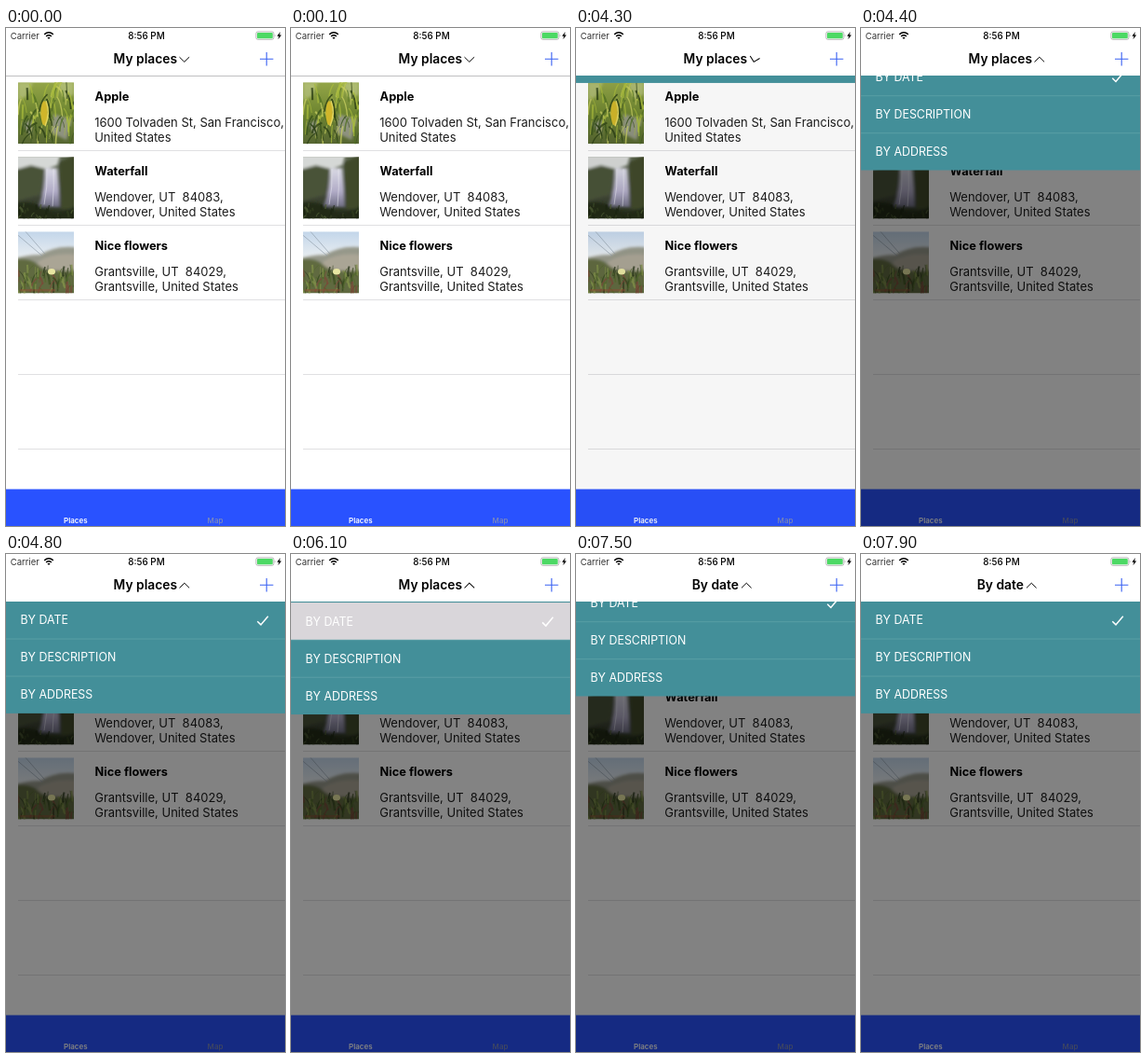
These frames come from a looping animation (300 by 534 pixels, 8 s). An HTML page:

```html
<!DOCTYPE html>
<html lang="en">
<head>
<meta charset="utf-8">
<title>My places</title>
<style>
  html, body { margin: 0; width: 100%; height: 100%; overflow: hidden; background: #fff; }
  svg { display: block; width: 100vw; height: 100vh; }
  text { font-family: Inter, Roboto, "Liberation Sans", sans-serif; white-space: pre; }
  .name { font-size: 12.8px; font-weight: 700; }
  .detail { font-size: 13px; fill: #1c1c1c; }
  .title { font-size: 13.8px; font-weight: 600; text-anchor: middle; }
  .option { font-size: 12.4px; fill: #fff; }
  .tab { font-size: 8px; text-anchor: middle; }
</style>
</head>
<body>
<svg viewBox="0 0 300 534" preserveAspectRatio="none">
  <defs>
    <clipPath id="photo"><rect width="60" height="66"/></clipPath>
    <filter id="soft"><feGaussianBlur stdDeviation="1.6"/></filter>
    <linearGradient id="leaves" x2="0" y2="1">
      <stop offset="0" stop-color="#93a548"/><stop offset=".5" stop-color="#6e8530"/><stop offset="1" stop-color="#566632"/>
    </linearGradient>
    <linearGradient id="cliff" x2="0" y2="1">
      <stop offset="0" stop-color="#5f6852"/><stop offset=".6" stop-color="#43493a"/><stop offset="1" stop-color="#222b16"/>
    </linearGradient>
    <linearGradient id="fall" x2="0" y2="1">
      <stop offset="0" stop-color="#d9d9e4"/><stop offset=".6" stop-color="#b0abc6"/><stop offset="1" stop-color="#6c6b80"/>
    </linearGradient>
    <linearGradient id="sky" x2="0" y2="1">
      <stop offset="0" stop-color="#c3d6ea"/><stop offset=".5" stop-color="#f0f2f2"/>
    </linearGradient>
  </defs>

  <rect width="300" height="534" fill="#fff"/>
  <g id="list"></g>

  <rect y="494.5" width="300" height="39.5" fill="#2952ff"/>
  <text class="tab" x="74.8" y="530.9" fill="#fff" font-weight="600">Places</text>
  <text class="tab" x="225" y="530.9" fill="#808cb8" font-weight="500">Map</text>
  <rect y="51" width="300" height=".8" fill="#b0b0b2"/>

  <rect id="mask" y="51" width="300" height="483"/>
  <g id="menu">
    <rect y="-249" width="300" height="420" fill="#438f99"/>
    <rect id="highlight" y="51" width="300" height="40" fill="#d9d6da"/>
    <path d="M0 91.2H300M0 131.2H300" stroke="#5fa1a9" stroke-width=".8"/>
    <text class="option" x="15.5" y="75.6">BY DATE</text>
    <text class="option" x="15.5" y="115.6">BY DESCRIPTION</text>
    <text class="option" x="15.5" y="155.6">BY ADDRESS</text>
    <path d="M270.3 72.3L274 76L281.8 66.8" fill="none" stroke="#fff" stroke-width="1.5"/>
  </g>

  <rect width="300" height="51" fill="#fff"/>
  <text x="4.7" y="11.6" font-size="9.5" fill="#333">Carrier</text>
  <path d="M41.2 6.9Q46 2.7 50.8 6.9M43.1 9Q46 6.5 48.9 9" fill="none" stroke="#000" stroke-width="1.5"/>
  <path d="M44.4 10.3Q46 9 47.6 10.3L46 12Z"/>
  <text x="151" y="11.7" font-size="9.9" font-weight="500" text-anchor="middle">8:56 PM</text>
  <rect x="268.9" y="3.9" width="19" height="8.4" rx="2" fill="none" stroke="#999" stroke-width=".7"/>
  <rect x="270" y="5" width="16.8" height="6.2" rx="1" fill="#4cd964"/>
  <path d="M288.9 6.7Q290.3 8.1 288.9 9.5Z" fill="#999"/>
  <path d="M295 4L291.4 8.7H293.5L292.5 12.3L296.2 7.4H294.1Z"/>

  <g id="heading">
    <text id="title" class="title" x="149.8" y="38.2"></text>
    <path id="arrow" d="M-5.3 -2.6L0 2.6L5.3 -2.6" fill="none" stroke="#000"/>
  </g>
  <path d="M273 33.3H287.4M280.2 26.1V40.5" stroke="#3a62f2" stroke-width="1.1"/>
</svg>

<script>
const LOOP = 8000, STEP = 100;
const get = id => document.getElementById(id);
const clamp = v => Math.max(0, Math.min(1, v));

function randomizer(seed) {
  return () => (seed = (seed * 16807) % 2147483647) / 2147483647;
}

// Curved blades scattered over a region of a photo.
function blades(seed, count, top, height, length, colors) {
  const rand = randomizer(seed);
  return Array.from({ length: count }, () => {
    const x = rand() * 60, y = top + rand() * height;
    const lean = (rand() - .5) * length, rise = length * (.5 + rand() * .5);
    const color = colors[Math.floor(rand() * colors.length)];
    return `<path d="M${x} ${y}q${lean * .2} ${-rise * .7} ${lean} ${-rise}" fill="none"
      stroke="${color}" stroke-width="${.6 + rand() * 1.8}" opacity=".75"/>`;
  }).join('');
}

const photos = [
  () => `<rect width="60" height="66" fill="url(#leaves)"/>
    <g filter="url(#soft)">
      <path d="M0 0H16L9 15L0 20ZM42 0H60V13L50 18Z" fill="#c3cc90" opacity=".6"/>
      <path d="M38 34L58 40L52 62L36 54ZM4 44L16 40L14 58Z" fill="#a3a0a0" opacity=".7"/>
    </g>
    ${blades(71, 70, 14, 62, 22, ['#36501a', '#4f7020', '#a9bb3c', '#273b12', '#c9cf62'])}
    <ellipse cx="28" cy="33" rx="3.6" ry="13" fill="#d0b62b"/>
    <path d="M30 20Q35 33 29 47" fill="none" stroke="#e5d65d" stroke-width="1.5"/>`,
  () => `<rect width="60" height="66" fill="url(#cliff)"/>
    <g filter="url(#soft)">
      <path d="M-4 -4H46L42 9L30 13L14 9L-4 14Z" fill="#d5d8d6"/>
      <path d="M-4 14L16 10L28 13L24 40L-4 48Z" fill="#4a5338"/>
      <path d="M44 6L64 -4V56H46Z" fill="#3f4a2c"/>
      <path d="M29 12H42Q44 32 45 54L22 53Q29 34 29 12Z" fill="url(#fall)"/>
      <path d="M-4 50Q15 45 28 55T64 52V70H-4Z" fill="#222b16"/>
    </g>
    ${blades(29, 30, 54, 16, 7, ['#1b2411', '#4d5b33', '#303d1e'])}
    <path d="M31 13Q32 32 28 51M38 13Q39 33 37 53" fill="none" stroke="#eeeef4" opacity=".5"/>`,
  () => `<rect width="60" height="66" fill="url(#sky)"/>
    <g filter="url(#soft)">
      <path d="M-4 29Q14 24 24 25Q40 14 64 17V70H-4Z" fill="#96988a"/>
      <path d="M22 32Q38 22 64 25V46H16Z" fill="#aaa595"/>
      <path d="M-4 30Q14 27 22 36T64 41V70H-4Z" fill="#606b40"/>
    </g>
    ${blades(53, 64, 44, 28, 15, ['#36461f', '#52682b', '#7f8f49', '#28341a', '#7a4a38'])}
    <path d="M0 4L26 26M8 0L29 24" stroke="#8896a2" stroke-width=".6"/>
    <ellipse cx="36" cy="43" rx="4" ry="3.3" fill="#e8e6a2"/>
    <path d="M2 63H40" stroke="#8d4c34" stroke-width="2.5" opacity=".5"/>`
];

const places = [
  ['Apple', '1600 Tolvaden St, San Francisco,', 'United States'],
  ['Waterfall', 'Wendover, UT  84083,', 'Wendover, United States'],
  ['Nice flowers', 'Grantsville, UT  84029,', 'Grantsville, United States']
];

get('list').innerHTML = places.map(([name, line1, line2], i) =>
  `<g transform="translate(0 ${i * 80})">
    <g transform="translate(13 58.3)" clip-path="url(#photo)">${photos[i]()}</g>
    <text class="name" x="95.6" y="77.6">${name}</text>
    <text class="detail" x="95.2" y="105.5">${line1}</text>
    <text class="detail" x="95.2" y="121.5">${line2}</text>
  </g>`).join('') +
  [131, 211, 291, 371, 451].map(y =>
    `<rect x="13" y="${y}" width="287" height="1" fill="#e0e0e2"/>`).join('');

// Underdamped spring from 0 to 1.
function spring(seconds) {
  const damping = .7, omega = 20, swing = Math.sqrt(1 - damping * damping);
  const a = omega * swing * seconds;
  return 1 - Math.exp(-damping * omega * seconds) * (Math.cos(a) + damping / swing * Math.sin(a));
}

const HEIGHT = 120;

function opening(ms) {
  const u = clamp(ms / 120);
  return { shift: HEIGHT * (spring(ms / 1000) - 1), shown: u * u * (3 - 2 * u) };
}

// The menu dips slightly before it leaves.
function closing(ms) {
  const u = clamp(ms / 200);
  return { shift: -125 * u * u * (2.7 * u - 1.7), shown: 1 - u * u };
}

function menuState(t) {
  if (t >= 7400) return opening(t - 7380);
  if (t >= 6100) return closing(t - 6085);
  if (t >= 4300) return opening(t - 4280);
  return { shift: -HEIGHT, shown: 0 };
}

function draw(t) {
  const { shift, shown } = menuState(t);
  const byDate = t >= 6200;
  const pressed = (t >= 4100 && t < 4300) || (t >= 7300 && t < 7400);

  get('menu').setAttribute('transform', `translate(0 ${shift.toFixed(2)})`);
  get('menu').style.display = shown > 0 ? '' : 'none';
  get('mask').setAttribute('opacity', .49 * shown);
  get('highlight').style.display = t === 6100 ? '' : 'none';
  get('title').textContent = byDate ? 'By date' : 'My places';
  get('heading').setAttribute('opacity', pressed ? .5 : 1);
  get('arrow').setAttribute('transform',
    `translate(${byDate ? 183.3 : 191.8} 33.8) rotate(${180 * shown})`);
}

const start = performance.now();
function tick(now) {
  const elapsed = Math.max(0, now - start) % LOOP;
  draw(Math.floor(elapsed / STEP) * STEP);
  requestAnimationFrame(tick);
}
draw(0);
requestAnimationFrame(tick);
</script>
</body>
</html>
```
